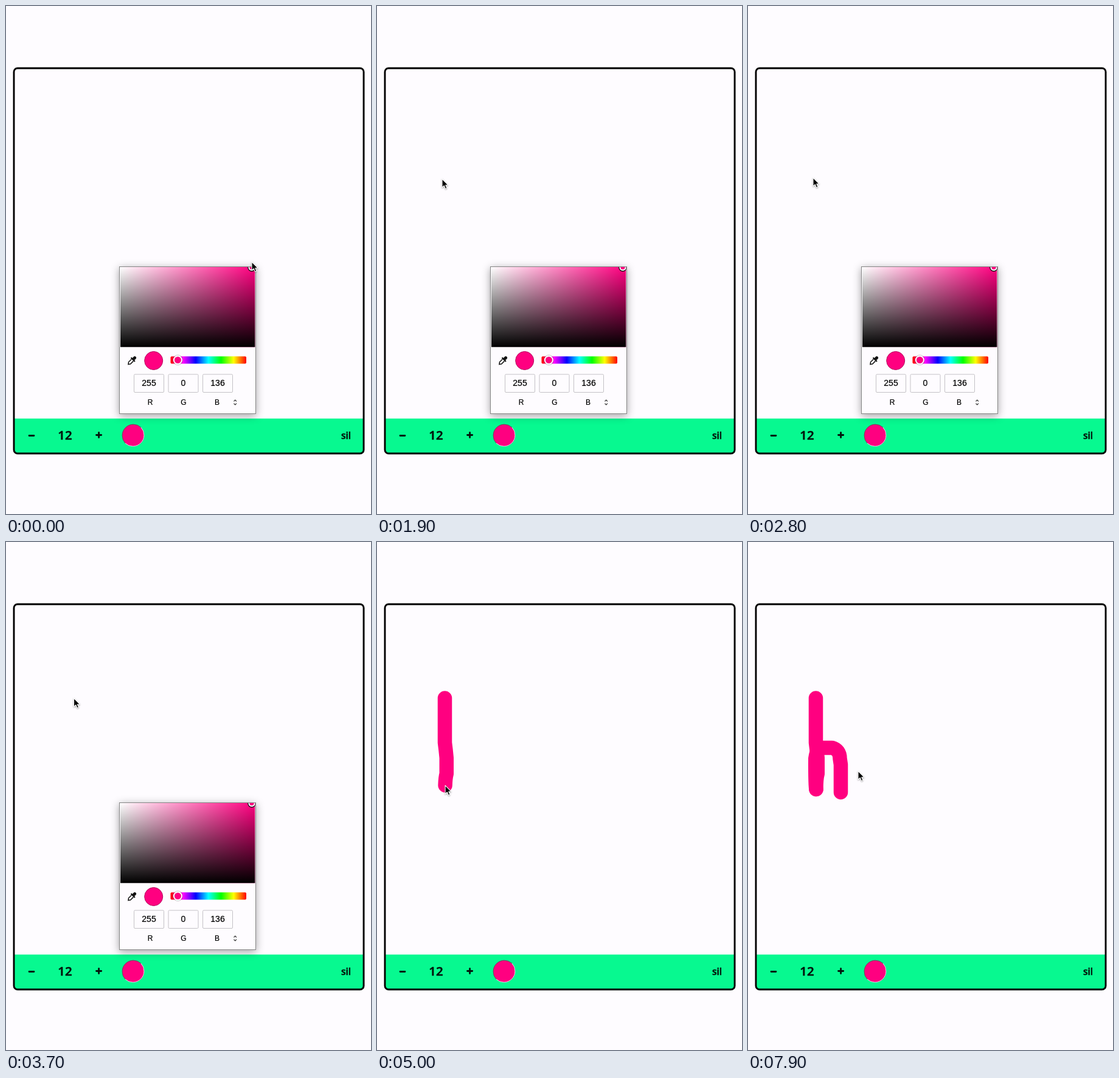
Animation, 600 px wide and 833 px high, one loop 8 s. Source, as an HTML page:

```html
<!DOCTYPE html>
<html lang="en">
<head>
<meta charset="utf-8">
<title>Drawing pad</title>
<style>
  html, body { margin: 0; width: 100%; height: 100%; overflow: hidden; background: #fefcff; }
  svg { display: block; width: 100%; height: 100%; }
  .bar-text { font-family: "Open Sans", sans-serif; font-weight: 600; text-anchor: middle;
    stroke: #04150c; stroke-width: .5; stroke-linejoin: round; fill: #04150c; }
  .picker-text { font-family: "Liberation Sans", Arial, sans-serif; text-anchor: middle;
    fill: #000; stroke: #000; stroke-width: .2; }
  #picker { filter: drop-shadow(0 3px 7px rgba(0, 0, 0, .36)); }
  #cursor { filter: drop-shadow(0 1px 1px rgba(0, 0, 0, .35)); }
  .ink { fill: none; stroke: #ff0080; stroke-width: 23.5; stroke-linecap: round; stroke-linejoin: round; }
</style>
</head>
<body>
<svg viewBox="0 0 600 833">
  <defs>
    <linearGradient id="tint">
      <stop stop-color="#fff"/><stop offset="1" stop-color="#ff0080"/>
    </linearGradient>
    <linearGradient id="shade" x2="0" y2="1">
      <stop stop-opacity="0"/><stop offset="1"/>
    </linearGradient>
    <linearGradient id="hue"></linearGradient>
    <clipPath id="field"><rect x="188" y="428" width="221.500" height="131.500"/></clipPath>
  </defs>

  <rect width="600" height="833" fill="#fefcff"/>
  <path d="M14 676.400H588V733H14Z" fill="#07f990"/>
  <rect x="13" y="102" width="575" height="631.800" rx="6" fill="none" stroke="#000" stroke-width="2.900"/>

  <path d="M38 704.500H46M148.500 703.500H156.700M152.600 699.400V707.600"
    stroke="#04150c" stroke-width="2.800" stroke-linecap="round"/>
  <text class="bar-text" x="97" y="711" font-size="20.500">12</text>
  <text class="bar-text" x="559" y="709.500" font-size="15.500">sil</text>

  <circle cx="209" cy="704" r="18.200" fill="#ff0080"/>
  <g fill="none" stroke-width=".9">
    <path d="M196 717A18.400 18.400 0 0 1 222 691" stroke="#555"/>
    <path d="M222 691A18.400 18.400 0 0 1 196 717" stroke="#e9e6ea"/>
  </g>

  <g id="picker">
    <rect x="186.500" y="427.500" width="224" height="241" fill="#fefcff" stroke="#858585"/>
    <g clip-path="url(#field)">
      <rect x="188" y="428" width="221.500" height="131.500" fill="url(#tint)"/>
      <rect x="188" y="428" width="221.500" height="131.500" fill="url(#shade)"/>
      <circle cx="404" cy="428.500" r="6" fill="#ff0080" stroke="#111" stroke-width="1.800"/>
      <circle cx="404" cy="428.500" r="4.600" fill="none" stroke="#fff" stroke-width="2"/>
    </g>

    <g transform="translate(207 581.500) rotate(45)">
      <path d="M-2.200 -1V5.500L0 8.500L2.200 5.500V-1" fill="none" stroke="#111" stroke-width="1.500"/>
      <path d="M-4.500 -2.400H4.500" stroke="#111" stroke-width="2.200"/>
      <rect x="-2.500" y="-9" width="5" height="7" rx="2.300" fill="#111"/>
    </g>
    <circle cx="242.700" cy="581.500" r="15" fill="#ff0080" stroke="#b3055f"/>
    <rect x="270.500" y="574.500" width="124.500" height="12" rx="2" fill="url(#hue)"/>
    <circle cx="282.400" cy="580.500" r="8" fill="none" stroke="#777" stroke-opacity=".45"/>
    <circle cx="282.400" cy="580.500" r="6.500" fill="#ff0080" stroke="#fff" stroke-width="2"/>

    <g id="channels"></g>
    <path d="M374.500 648.300L376.700 646L378.900 648.300M374.500 651.700L376.700 654L378.900 651.700"
      fill="none" stroke="#222" stroke-width="1.100"/>
  </g>

  <g id="moves"></g>
  <path id="cursor" d="M0 0V14.200L3.300 11.200L5.500 16.300L8 15.200L5.800 10.200H10Z"
    fill="#000" stroke="#fff" stroke-width="1.100" stroke-linejoin="round"/>
</svg>
<script>
const LOOP = 8000, STEP = 100, PEN_DOWN = 4300;
const $ = id => document.getElementById(id);

const linear = u => u;
const smooth = u => u * u * (3 - 2 * u);

// Each pointer move eases along its own path; the inked ones leave a line behind.
const moves = [
  { start: 0, end: 800, ease: smooth, d: "M404 419.500L172 253.500" },
  { start: 1500, end: 1700, ease: linear, d: "M172 253.500L107 283.500" },
  { start: 1900, end: 2800, ease: linear, d: "M107 283.500V281.500" },
  { start: 2800, end: 3700, ease: linear, d: "M107 281.500L111.500 256" },
  { start: PEN_DOWN, end: 5100, ease: smooth, inked: true,
    d: "M111.500 256V329Q113 340 114.300 354V380Q112 388 112 405.500" },
  { start: 5200, end: 6900, ease: linear, inked: true,
    d: "M112 405.500Q110.500 400 110.800 355Q113 337.400 122 337.400H138Q151 341 151 355L152.500 365V410.500" },
  { start: 7300, end: 7900, ease: smooth, d: "M152.500 410.500L181 375.500" }
];

$("moves").innerHTML = moves.map(m =>
  `<path d="${m.d}" ${m.inked ? 'class="ink"' : 'fill="none"'}/>`).join("");
moves.forEach((move, i) => {
  move.line = $("moves").children[i];
  move.length = move.line.getTotalLength();
});

$("hue").innerHTML = Array.from({ length: 7 }, (_, i) =>
  `<stop offset="${i / 6}" stop-color="hsl(${360 - i * 60}, 100%, 50%)"/>`).join("");

$("channels").innerHTML = [["R", 255], ["G", 0], ["B", 136]].map(([label, value], i) => {
  const x = 210.5 + i * 56.5;
  return `<rect x="${x}" y="604" width="49" height="29.5" rx="1.5" fill="#fefcff" stroke="#c4c2c6"/>
    <text class="picker-text" x="${x + 24.5}" y="623" font-size="14">${value}</text>
    <text class="picker-text" x="${237 + i * 55}" y="654" font-size="12">${label}</text>`;
}).join("");

function draw(now) {
  const t = Math.floor(now % LOOP / STEP) * STEP;
  for (const { start, end, ease, inked, line, length } of moves) {
    const u = Math.min(1, Math.max(0, (t - start) / (end - start)));
    const reached = ease(u) * length;
    if (t >= start) {
      const { x, y } = line.getPointAtLength(reached);
      $("cursor").setAttribute("transform", `translate(${x} ${y})`);
    }
    if (inked) {
      line.style.visibility = t >= start ? "visible" : "hidden";
      line.style.strokeDasharray = `${reached + .01} ${length + 50}`;
    }
  }
  $("picker").style.display = t < PEN_DOWN ? "" : "none";
}

const origin = performance.now();
function tick() {
  draw(performance.now() - origin);
  requestAnimationFrame(tick);
}
tick();
</script>
</body>
</html>
```
